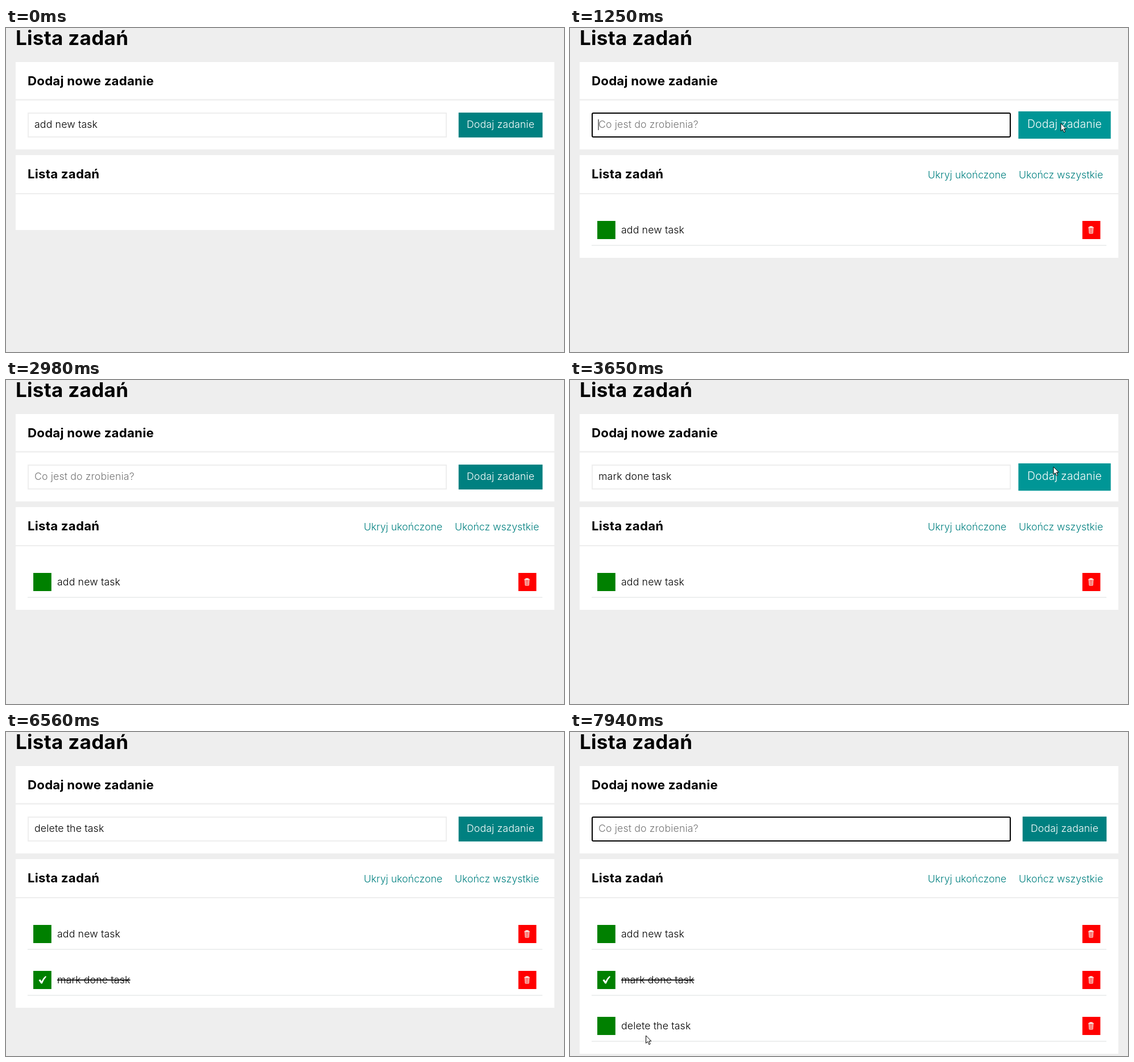
These frames come from a looping animation (981 by 571 pixels, 8000 ms). An HTML page:

```html
<!DOCTYPE html>
<html lang="pl">
<head>
<meta charset="utf-8">
<title>Lista zadań</title>
<style>
  html, body { margin: 0; height: 100%; overflow: hidden; background: #eee; }
  svg { display: block; width: 100vw; height: 100vh; }
  text { font: 300 17.7px Inter, "Open Sans", sans-serif; letter-spacing: .15px; white-space: pre; }
  .h1 { font-size: 35px; font-weight: 700; letter-spacing: .3px; }
  .h2 { font-size: 22.2px; font-weight: 700; letter-spacing: .25px; }
  .link { fill: #008080; letter-spacing: 0; }
  .panel { fill: #fff; }
  .line { fill: #eee; }
</style>
</head>
<body>
<svg viewBox="0 0 981 571">
  <defs>
    <g id="trash" fill="none" stroke="#f6e8e0">
      <path d="M-3.8 -4L-3 6H3L3.8 -4Z" fill="#f6e8e0" fill-opacity=".35"/>
      <path d="M-4.7 -4.5H4.7M-2 -4.5V-6H2V-4.5" stroke-width="1.4"/>
      <path d="M-1.5 -2.5L-1.2 4.5M1.5 -2.5L1.2 4.5" stroke-width=".9"/>
    </g>
  </defs>
  <rect width="981" height="571" fill="#eee"/>
  <text class="h1" x="17" y="30">Lista zadań</text>

  <rect class="panel" x="17" y="60" width="947" height="154"/>
  <rect class="line" x="17" y="125.3" width="947" height="2.4"/>
  <text class="h2" x="38" y="100.5">Dodaj nowe zadanie</text>
  <rect id="field" x="39" y="150" width="735" height="42" fill="#fff" stroke-width="2"/>
  <text id="value" x="50" y="176"></text>
  <rect id="caret" x="49.5" y="161" width="1" height="19"/>
  <g id="button">
    <rect id="buttonFill" x="795.7" y="149.1" width="147.6" height="43.8"/>
    <text x="869.5" y="176" fill="#fff" text-anchor="middle">Dodaj zadanie</text>
  </g>

  <rect id="list" class="panel" x="17" y="224" width="947"/>
  <rect class="line" x="17" y="291" width="947" height="2"/>
  <text class="h2" x="38" y="264.5">Lista zadań</text>
  <g id="links">
    <text class="link" x="629" y="264.5">Ukryj ukończone</text>
    <text class="link" x="789" y="264.5">Ukończ wszystkie</text>
  </g>
  <g id="rows"></g>
  <path id="cursor" d="M0 0V13.5L3.1 10.6L5.4 15.8L7.6 14.8L5.3 9.8H9.4Z" fill="#fff" stroke="#000"/>
</svg>
<script>
const LOOP = 8000;
const $ = id => document.getElementById(id);
const clamp = v => Math.max(0, Math.min(1, v));
const smooth = v => v * v * (3 - 2 * v);
const show = (el, on) => el.setAttribute('visibility', on ? 'visible' : 'hidden');

const tasks = [
  { text: 'add new task', added: 1180 },
  { text: 'mark done task', added: 3840, done: 5100 },
  { text: 'delete the task', added: 7200 }
];

// [start, typed text, focused]
const inputStates = [
  [0, 'add new task', false], [1180, '', true], [2980, '', false],
  [3110, 'mark done task', false], [3840, '', true], [5100, '', false],
  [6560, 'delete the task', false], [7200, '', true]
];

// Each pass is a visible stretch of pointer movement: [time, x, y]
const pointerPasses = [
  [[120, 944, 531], [450, 863, 168], [1650, 863, 168], [2240, 880, 575]],
  [[3110, 890, 481], [3440, 858, 190], [3650, 850, 153], [3780, 854, 165], [3900, 854, 165],
   [4630, 62, 440], [5160, 62, 440], [5620, 130, 529], [6560, 130, 529]],
  [[6660, 885, 558], [6990, 866, 170], [7390, 866, 170], [7590, 880, 292]],
  [[7730, 123, 550], [7940, 133.5, 535], [LOOP, 134, 535]]
];
const buttonHovers = [[390, 1760], [3400, 4010], [6880, 7450]];
const checkHovers = [[4520, 5240]];

const hoverAmount = (hovers, t) => hovers.reduce((sum, [on, off]) =>
  sum + smooth(clamp((t - on) / 200)) - smooth(clamp((t - off) / 200)), 0);

const shade = amount => Math.round(128 + 22 * amount);

$('rows').innerHTML = tasks.map((task, i) => `
  <g transform="translate(0 ${i * 81})">
    <rect class="check" x="48" y="340" width="31.8" height="32"/>
    <g class="done">
      <path d="M57.5 356.5L60 354.8L62.6 358.2Q65.5 352 69.6 349L71 350.2Q66.5 355 63.6 362.5H61.6Z" fill="#fff"/>
    </g>
    <text x="90" y="361.8">${task.text}</text>
    <rect x="900.8" y="340" width="31.6" height="32" fill="red"/>
    <use href="#trash" x="916" y="356"/>
    <rect x="38" y="382.3" width="905" height="1.6" fill="#e9ebeb"/>
  </g>`).join('');
const rows = [...$('rows').children];

function pointerAt(t) {
  const pass = pointerPasses.find(p => t >= p[0][0] && t < p[p.length - 1][0]);
  if (!pass) return null;
  const next = pass.findIndex(p => p[0] > t);
  const [t0, x0, y0] = pass[next - 1], [t1, x1, y1] = pass[next];
  const k = smooth((t - t0) / (t1 - t0));
  return [x0 + (x1 - x0) * k, y0 + (y1 - y0) * k];
}

function drawInput(t) {
  const [start, text, focused] = inputStates.filter(s => s[0] <= t).pop();
  const field = $('field');
  field.setAttribute('stroke', focused ? '#000' : '#eee');
  field.setAttribute('rx', focused ? 2 : 0);
  $('value').textContent = text || 'Co jest do zrobienia?';
  $('value').setAttribute('fill', text ? '#000' : '#757575');
  const blink = Math.floor(Math.max(0, t - start - 65) / 530);
  show($('caret'), focused && blink % 2 === 0);
}

function drawButton(t) {
  const hover = hoverAmount(buttonHovers, t), c = shade(hover);
  $('button').setAttribute('transform',
    `translate(869.5 171) scale(${1 + 0.1 * hover}) translate(-869.5 -171)`);
  $('buttonFill').setAttribute('fill', `rgb(0,${c},${c})`);
}

function drawList(t) {
  const count = tasks.filter(task => t >= task.added).length;
  $('list').setAttribute('height', count ? 100 + 81 * count : 132);
  show($('links'), count > 0);
  rows.forEach((row, i) => {
    const { added, done } = tasks[i], isDone = t >= done;
    row.style.display = t >= added ? '' : 'none';
    row.querySelector('.done').style.display = isDone ? '' : 'none';
    row.querySelector('text').style.textDecoration = isDone ? 'line-through' : 'none';
    const hover = i === 1 ? hoverAmount(checkHovers, t) : 0;
    row.querySelector('.check').setAttribute('fill', `rgb(0,${shade(hover)},0)`);
  });
}

function drawPointer(t) {
  const position = pointerAt(t);
  show($('cursor'), position);
  if (position) $('cursor').setAttribute('transform', `translate(${position})`);
}

const begin = performance.now();
function frame() {
  const t = (performance.now() - begin) % LOOP;
  drawInput(t);
  drawButton(t);
  drawList(t);
  drawPointer(t);
  requestAnimationFrame(frame);
}
frame();
</script>
</body>
</html>
```
